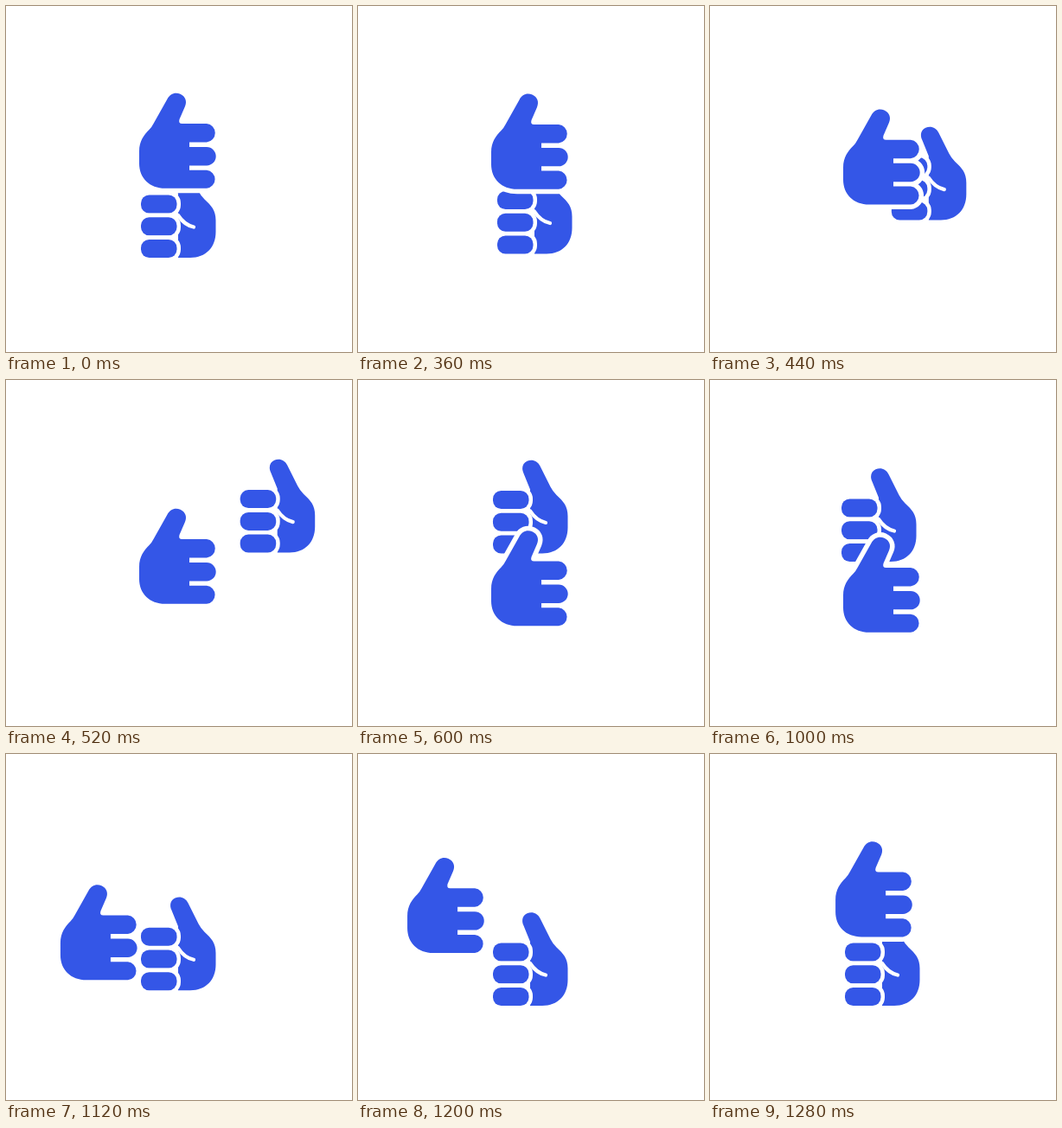
Write an HTML page that moves like this. It is 400 by 400 pixels and loops after 1.32 s.

```html
<!DOCTYPE html>
<html lang="en">
<head>
<meta charset="utf-8">
<title>Climbing thumbs</title>
<style>
  html, body { margin: 0; width: 100%; height: 100%; overflow: hidden; background: #fff; }
  svg { display: block; width: 100%; height: 100%; filter: blur(.7px); }
  g { fill: #3456e7; stroke: #fff; paint-order: stroke; }
</style>
</head>
<body>
<svg viewBox="0 0 400 400">
  <g id="curled" stroke-width="9">
    <path stroke="none" d="M191.5 198.5C188.5 192 190.5 186.5 195.5 184.2C201.5 181.8 207.5 184 210.5 190L222.5 214Q225 219 229.5 223.5C237.5 231 242.5 236 242.5 248V261C242.5 279 231 291 213 291H199V217Z"/>
    <path fill="none" stroke-width="4.2" stroke-linecap="round" d="M199 242Q206 253 217 255.5"/>
    <rect x="156" y="218.5" width="41.5" height="21" rx="9.5"/>
    <rect x="156" y="244.3" width="41.5" height="21" rx="9.5"/>
    <rect x="156" y="270" width="41.5" height="21" rx="9.5"/>
  </g>
  <g id="open" stroke-width="11" stroke-linejoin="round">
    <path d="M186.5 107.5C189.5 101.5 195.5 99.2 201.5 101.7C207.5 104.5 209.5 110 207 116L200.5 131Q199 136 203.5 136H232a10.8 10.8 0 0 1 0 21.5H212V163H232a10.7 10.7 0 0 1 0 21.4H212V189.7H232a10.6 10.6 0 0 1 0 21.1H184C166 210.8 154 199 154 182V168C154 156 159.5 149 165.5 143Q168.5 140 170.5 136Z"/>
  </g>
</svg>
<script>
  const LOOP = 1320, STEP = 40, RISE = 81;
  const clamp = u => Math.min(1, Math.max(0, u));

  // 0 to 1 with soft ends
  function ease(time, start, end) {
    const u = clamp((time - start) / (end - start));
    return u * u * (3 - 2 * u);
  }

  // Out and back; a power above 1 delays the turning point
  function swing(time, start, span, power = 1) {
    return Math.sin(Math.PI * clamp((time - start) / span) ** power);
  }

  function place(id, x, y) {
    document.getElementById(id).setAttribute("transform", `translate(${x} ${y})`);
  }

  function draw() {
    const t = Math.floor(performance.now() % LOOP / STEP) * STEP;

    // The curled hand swings right and hops on top, then drops straight down
    place("curled",
      115 * swing(t, 320, 280, 2.2) - 4 * (ease(t, 600, 680) - ease(t, 1000, 1120)),
      -RISE * (ease(t, 330, 540) - ease(t, 1000, 1172)) - 24 * swing(t, 500, 115));

    // The open hand drops straight down, then swings left and back on top
    place("open",
      -106 * swing(t, 1000, 286, 1.28),
      RISE * (ease(t, 340, 660) - ease(t, 995, 1295)));

    requestAnimationFrame(draw);
  }
  draw();
</script>
</body>
</html>
```
